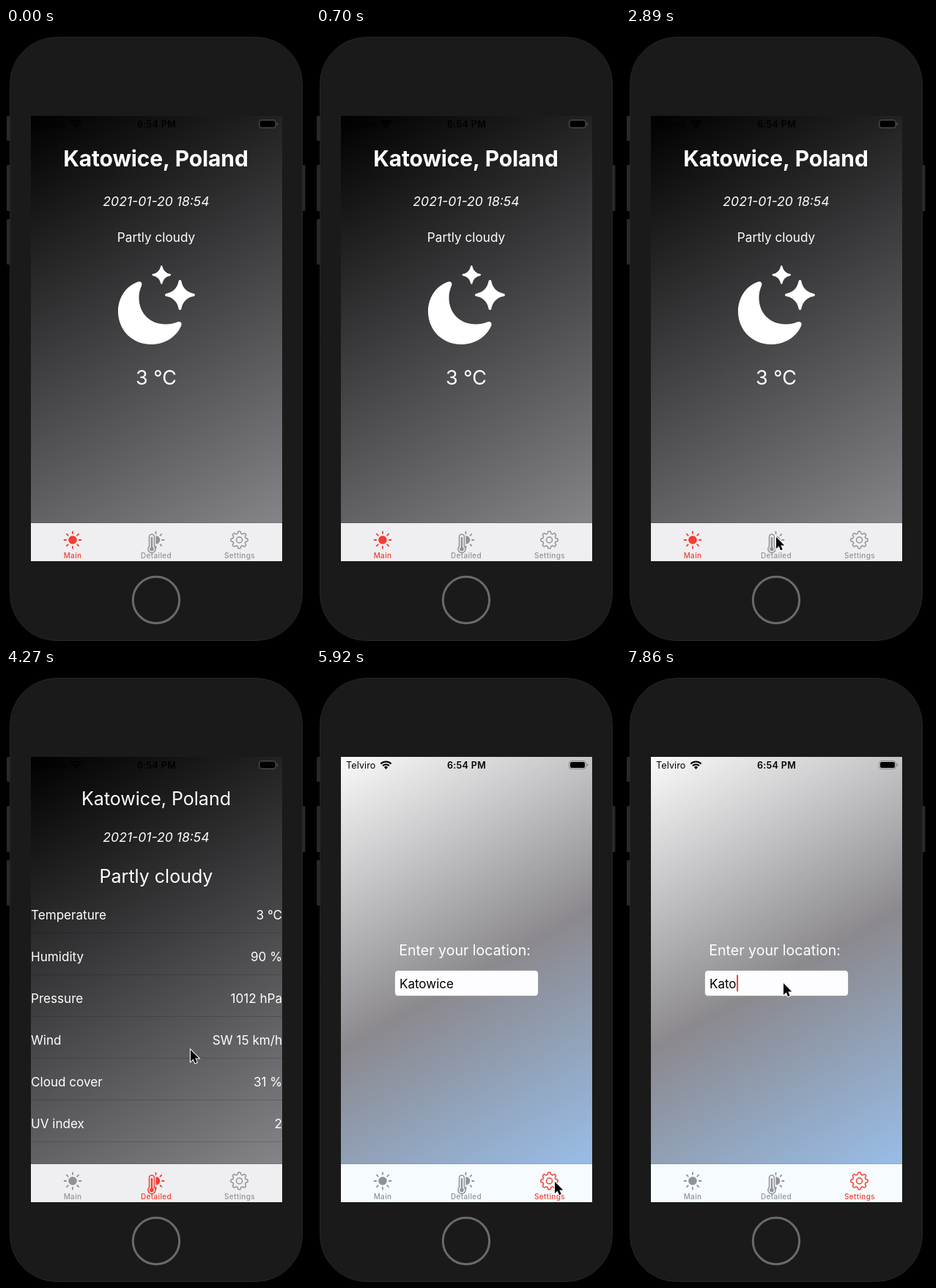
Recreate the animation shown at these times as an HTML page with a canvas. Size 415x837 px, loop 8 s.

```html
<!DOCTYPE html>
<html lang="en">
<head>
<meta charset="utf-8">
<title>Weather app</title>
<style>
html, body { margin: 0; width: 100%; height: 100%; overflow: hidden; background: #000; }
canvas { display: block; }
</style>
</head>
<body>
<canvas id="stage" width="415" height="837"></canvas>
<script>
const ctx = document.getElementById('stage').getContext('2d');
const LOOP = 8000;
const SCREEN = { x: 34, y: 120, w: 343, h: 608 };
const RED = '#f43d33', GREY = '#929296';

// Pointer moves: first step, last step, number of steps, waypoints
const MOVES = [
  [796, 1180, 5, [[424, 850], [352, 560], [224, 16]]],
  [1370, 2130, 9, [[224, 16], [177, 220], [221, 420]]],
  [2220, 2890, 8, [[221, 420], [199, 600], [205, 695]]],
  [3880, 3980, 2, [[205, 695], [212, 630], [252, 512]]],
  [4270, 4270, 1, [[252, 512], [252, 520]]],
  [4670, 5130, 6, [[252, 520], [305, 640], [352, 730]]],
  [5330, 5620, 4, [[352, 730], [326, 700]]],
  [6110, 6500, 5, [[326, 700], [223, 441]]],
  [6700, 6890, 3, [[223, 441], [215, 429]]]
];

function along(points, u) {
  const s = u * (points.length - 1);
  const i = Math.min(Math.floor(s), points.length - 2);
  const f = s - i, [a, b] = [points[i], points[i + 1]];
  return [a[0] + (b[0] - a[0]) * f, a[1] + (b[1] - a[1]) * f];
}

function pointerAt(t) {
  let pos = null;
  for (const [start, end, steps, points] of MOVES) {
    if (t < start) break;
    const gap = steps > 1 ? (end - start) / (steps - 1) : 1;
    const k = Math.min(steps, Math.floor((t - start) / gap + 1e-6) + 1);
    pos = along(points, k / steps);
  }
  return pos;
}

function text(str, x, y, size, { weight = 400, align = 'center', color = '#fff', style = '', track = 0 } = {}) {
  ctx.font = `${style} ${weight} ${size}px Inter, "Noto Sans", sans-serif`;
  ctx.letterSpacing = track + 'px';
  ctx.textAlign = align;
  ctx.fillStyle = color;
  ctx.fillText(str, x, y);
  return ctx.measureText(str).width;
}

function box(x, y, w, h, r, fill, stroke, lw = 1) {
  ctx.beginPath();
  ctx.roundRect(x, y, w, h, r);
  if (fill) { ctx.fillStyle = fill; ctx.fill(); }
  if (stroke) { ctx.strokeStyle = stroke; ctx.lineWidth = lw; ctx.stroke(); }
}

function disc(x, y, r, from = 0, to = Math.PI * 2) {
  ctx.beginPath();
  ctx.arc(x, y, r, from, to);
  ctx.fill();
}

function rays(x, y, r0, r1, first, last) {
  ctx.beginPath();
  for (let i = first; i <= last; i++) {
    const c = Math.cos(i * Math.PI / 4), s = Math.sin(i * Math.PI / 4);
    ctx.moveTo(x + c * r0, y + s * r0);
    ctx.lineTo(x + c * r1, y + s * r1);
  }
  ctx.lineWidth = 1.8;
  ctx.lineCap = 'round';
  ctx.stroke();
}

function phone() {
  for (const [x, y, h] of [[1, 120, 34], [1, 187, 63], [1, 261, 62], [402, 187, 63]])
    box(x, y, 6.5, h, 1.5, '#292929');
  box(5.5, 12.5, 399, 824, 64, '#1a1a1a', '#262626');
  ctx.beginPath();
  ctx.arc(205, 781, 31.7, 0, Math.PI * 2);
  ctx.strokeStyle = '#6a6a6a';
  ctx.lineWidth = 3;
  ctx.stroke();
}

function backdrop(colors) {
  const { x, y, w, h } = SCREEN;
  const g = ctx.createLinearGradient(x, y, x + w, y + h);
  colors.forEach((c, i) => g.addColorStop(i / (colors.length - 1), c));
  ctx.fillStyle = g;
  ctx.fillRect(x, y, w, h);
}

function statusBar() {
  const color = '#000';
  text('Telviro', 41, 136, 12.6, { align: 'left', color, track: 0.1 });
  text('6:54 PM', 205.5, 136, 12.6, { weight: 600, color, track: 0.3 });
  ctx.strokeStyle = color;
  ctx.lineWidth = 2.2;
  ctx.lineCap = 'butt';
  for (const r of [6.2, 10]) {
    ctx.beginPath();
    ctx.arc(95.5, 136.5, r, -Math.PI * 0.75, -Math.PI * 0.25);
    ctx.stroke();
  }
  ctx.beginPath();
  ctx.moveTo(95.5, 137);
  ctx.arc(95.5, 136.5, 3.6, -Math.PI * 0.75, -Math.PI * 0.25);
  ctx.fill();
  box(345.5, 125.5, 23, 11, 3.5, null, 'rgba(100,100,100,.6)');
  box(347, 127, 20, 8, 2, color);
  box(369.6, 129, 1.6, 4, 0.8, 'rgba(100,100,100,.6)');
}

function sunIcon() {
  disc(91, 699, 5.8);
  rays(91, 699, 8.8, 11.4, 0, 7);
}

function thermometerIcon(color, bar) {
  disc(204.5, 699, 5.8, -Math.PI / 2, Math.PI / 2);
  rays(204.5, 699, 8.6, 11, -2, 2);
  const stem = (w, top, r, fill) => {
    box(199 - w / 2, top, w, 712 - top, w / 2, fill);
    disc(199, 711.5, r);
  };
  stem(8.4, 690.5, 5.8, color);
  stem(5.4, 692, 4.3, bar);
  stem(2.4, 695, 2.8, color);
}

function gearIcon() {
  ctx.beginPath();
  for (let i = 0; i <= 160; i++) {
    const a = i / 160 * Math.PI * 2;
    const r = 10.3 + 1.4 * Math.tanh(2.2 * Math.cos(8 * a));
    ctx.lineTo(318.5 + r * Math.cos(a), 699 + r * Math.sin(a));
  }
  ctx.closePath();
  ctx.lineWidth = 1.5;
  ctx.lineJoin = 'round';
  ctx.stroke();
  ctx.beginPath();
  ctx.arc(318.5, 699, 4, 0, Math.PI * 2);
  ctx.stroke();
}

function tabBar(active, bar) {
  ctx.fillStyle = bar;
  ctx.fillRect(34, 676, 343, 52);
  ctx.fillStyle = 'rgba(0,0,0,.25)';
  ctx.fillRect(34, 675.5, 343, 0.6);
  const icons = [sunIcon, thermometerIcon, gearIcon];
  ['Main', 'Detailed', 'Settings'].forEach((label, i) => {
    const color = i === active ? RED : GREY;
    ctx.fillStyle = ctx.strokeStyle = color;
    icons[i](color, bar);
    text(label, 91 + i * 114, 724, 10, { weight: 500, color, track: 0.35 });
  });
}

function star(x, y, r) {
  const k = r * 0.16;
  ctx.beginPath();
  ctx.moveTo(x, y - r);
  ctx.quadraticCurveTo(x + k, y - k, x + r, y);
  ctx.quadraticCurveTo(x + k, y + k, x, y + r);
  ctx.quadraticCurveTo(x - k, y + k, x - r, y);
  ctx.quadraticCurveTo(x - k, y - k, x, y - r);
  ctx.closePath();
  ctx.lineJoin = 'round';
  ctx.lineWidth = r * 0.2;
  ctx.fill();
  ctx.stroke();
}

const moon = new Path2D('M179 347C163 353 153 369 153 387C153 412 172 432 198 432' +
  'C217 432 232 422 239 407C241 403 238 400 234 401.5C229 403.5 224 404.5 218 404.5' +
  'C197 404.5 181.5 390 181.5 368C181.5 362 182.8 357 185 352C186.5 348 184 344.8 179 347Z');

function mainScreen() {
  backdrop(['#000', '#8e8e93']);
  statusBar();
  text('Katowice, Poland', 204.5, 189, 30, { weight: 700, track: -0.15 });
  text('2021-01-20 18:54', 205, 242.5, 17.6, { style: 'italic' });
  text('Partly cloudy', 205, 292, 17.2);
  ctx.fillStyle = ctx.strokeStyle = '#fff';
  ctx.fill(moon);
  star(212.3, 337, 11.6);
  star(237.5, 364.5, 18.6);
  text('3 °C', 205, 486.5, 27);
  tabBar(0, '#efeef0');
}

function detailScreen() {
  backdrop(['#000', '#8e8e93']);
  statusBar();
  text('Katowice, Poland', 205, 185.5, 25);
  text('2021-01-20 18:54', 205, 235.5, 17.6, { style: 'italic' });
  text('Partly cloudy', 205, 292, 25);
  const rows = [
    ['Temperature', '3 °C'], ['Humidity', '90 %'], ['Pressure', '1012 hPa'],
    ['Wind', 'SW 15 km/h'], ['Cloud cover', '31 %'], ['UV index', '2']
  ];
  rows.forEach(([name, value], i) => {
    const y = 342 + i * 57;
    text(name, 34, y, 17.1, { align: 'left' });
    text(value, 377, y, 17.1, { align: 'right' });
    ctx.fillStyle = 'rgba(0,0,0,.16)';
    ctx.fillRect(34, y + 18, 343, 1);
  });
  tabBar(1, '#efeef0');
}

function settingsScreen(t) {
  backdrop(['#fafafa', '#8b898e', '#9ac5f5']);
  statusBar();
  text('Enter your location:', 203, 390.5, 19.6);
  box(107.5, 411.5, 196, 35, 4.5, '#fdfdff', 'rgba(120,120,125,.5)');
  const removed = [7280, 7660, 7760, 7860].filter(at => t >= at).length;
  const width = text('Katowice'.slice(0, 8 - removed), 114, 435.5, 17, { align: 'left', color: '#000' });
  if (t >= 6980) box(114.5 + width, 417.5, 2, 23, 1, '#e8453a');
  tabBar(2, '#f5fbfe');
}

const arrow = new Path2D('M0 0V16L3.7 12.5L6.1 18.2L8.7 17.1L6.3 11.6H11.3Z');

function pointer(pos) {
  ctx.save();
  ctx.translate(...pos);
  ctx.lineJoin = 'miter';
  ctx.lineWidth = 2;
  ctx.strokeStyle = '#fff';
  ctx.stroke(arrow);
  ctx.fillStyle = '#000';
  ctx.fill(arrow);
  ctx.restore();
}

function draw(t) {
  ctx.fillStyle = '#000';
  ctx.fillRect(0, 0, 415, 837);
  if (t >= 500 && t < 700) {
    ctx.save();
    ctx.beginPath();
    ctx.rect(202, 779, 213, 58);
    ctx.clip();
    phone();
    ctx.restore();
    return;
  }
  phone();
  if (t < 3590) mainScreen();
  else if (t < 5920) detailScreen();
  else settingsScreen(t);
  const pos = pointerAt(t);
  if (pos) pointer(pos);
}

function tick() {
  draw(performance.now() % LOOP);
  requestAnimationFrame(tick);
}
tick();
</script>
</body>
</html>
```
